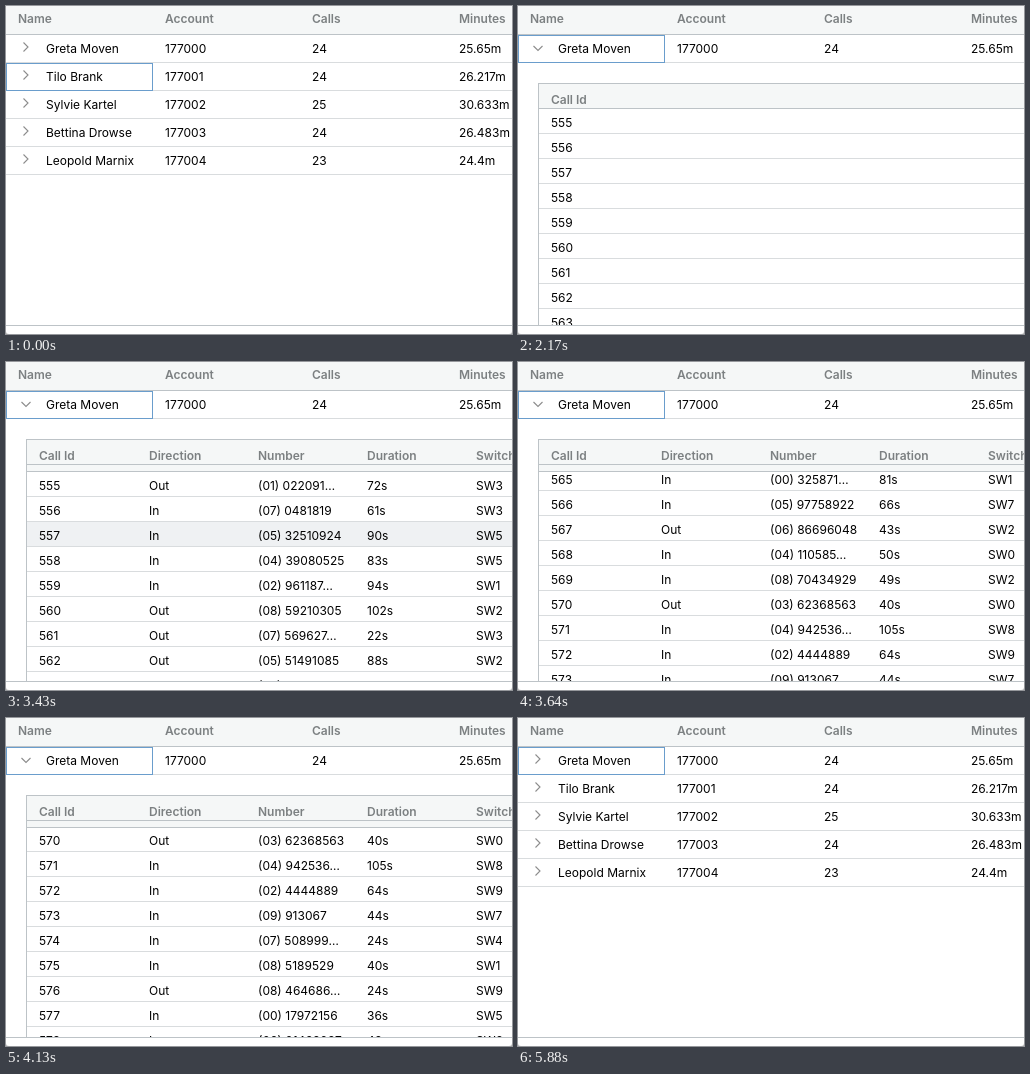
An HTML page with a canvas for the animation above (5.95 s loop, 506 by 328 pixels).

```html
<!DOCTYPE html>
<html lang="en">
<head>
<meta charset="utf-8">
<title>Master / detail table</title>
<style>
  html, body { margin: 0; width: 100%; height: 100%; overflow: hidden; background: #bbb; }
  canvas { display: block; width: 506px; height: 328px; border-radius: 0 0 3px 3px; }
</style>
</head>
<body>
<canvas></canvas>
<script>
const WIDTH = 506, HEIGHT = 328, LOOP = 5950;
const ROW = 28, HEAD = 29, BODY_END = 319;
const DETAIL_X = 20, DETAIL_Y = 77, DETAIL_HEIGHT = 300, CALL_ROW = 25, MAX_SCROLL = 376;
const OPEN_AT = 1750, COLUMNS_AT = 2240, SCROLL_AT = 3462, CLOSE_AT = 4860;
const COLOR = {
  text: '#000', label: '#7c8082', head: '#f5f7f7', border: '#bdc3c7',
  line: '#d9dcde', hover: '#eff1f3', focus: '#6a9dcc', arrow: '#8c8c8c'
};
const MAIN_X = [12, 159, 306, 453];
const CALL_X = [33, 143, 252, 361, 470];
const MAIN_LABELS = ['Name', 'Account', 'Calls', 'Minutes'];
const CALL_LABELS = ['Call Id', 'Direction', 'Number', 'Duration', 'Switch'];

const people = [
  ['Greta Moven', '177000', '24', '25.65m'],
  ['Tilo Brank', '177001', '24', '26.217m'],
  ['Sylvie Kartel', '177002', '25', '30.633m'],
  ['Bettina Drowse', '177003', '24', '26.483m'],
  ['Leopold Marnix', '177004', '23', '24.4m']
];

const digit = (row, place) => {
  const n = Math.sin(row * 12.9898 + place * 78.233) * 43758.5453;
  return Math.floor((n - Math.floor(n)) * 10);
};

// Long numbers are cut to six digits, as in a narrow column.
function phone(row, length) {
  const shown = length > 8 ? 6 : length;
  const digits = Array.from({ length: shown }, (_, k) => digit(row, k + 2)).join('');
  return `(0${digit(row, 1)}) ${digits}${length > 8 ? '…' : ''}`;
}

// Each call: direction, length of the number, seconds, switch
const calls = `Out 9 72 3,In 7 61 3,In 8 90 5,In 8 83 5,In 9 94 1,Out 8 102 2,
Out 9 22 3,Out 8 88 2,In 8 57 4,Out 7 35 6,In 9 81 1,In 8 66 7,Out 8 43 2,In 9 50 0,
In 8 49 2,Out 8 40 0,In 9 105 8,In 7 64 9,In 6 44 7,In 9 24 4,In 7 40 1,Out 9 24 9,
In 8 36 5,In 8 42 6`.split(',').map((entry, i) => {
  const [direction, length, seconds, sw] = entry.trim().split(' ');
  return [String(555 + i), direction, phone(i, +length), seconds + 's', 'SW' + sw];
});

const canvas = document.querySelector('canvas');
const ctx = canvas.getContext('2d');
const ratio = window.devicePixelRatio || 1;
canvas.width = WIDTH * ratio;
canvas.height = HEIGHT * ratio;

const clamp = v => Math.max(0, Math.min(1, v));
const during = (t, from, to) => t >= from && t < to;
const easeOut = p => 1 - (1 - clamp(p)) ** 3;

function rect(x, y, w, h, color) {
  ctx.fillStyle = color;
  ctx.fillRect(x, y, w, h);
}

function cells(values, xs, baseline, color = COLOR.text, weight = 400) {
  ctx.font = `${weight} 12px Inter, sans-serif`;
  ctx.fillStyle = color;
  values.forEach((value, i) => ctx.fillText(value, xs[i], baseline));
}

function clipped(x, y, w, h, draw) {
  ctx.save();
  ctx.beginPath();
  ctx.rect(x, y, w, h);
  ctx.clip();
  draw();
  ctx.restore();
}

function arrow(y, open) {
  const points = open ? [[15.5, 11], [20, 15.5], [24.5, 11]] : [[17.5, 7.5], [22, 12], [17.5, 16.5]];
  ctx.beginPath();
  points.forEach(([px, py]) => ctx.lineTo(px, y + py));
  ctx.strokeStyle = COLOR.arrow;
  ctx.lineWidth = 1.1;
  ctx.stroke();
}

function personRow(index, y, open, focused, hovered) {
  rect(0, y, WIDTH, ROW, hovered ? COLOR.hover : '#fff');
  rect(0, y + ROW - 1, WIDTH, 1, COLOR.line);
  arrow(y, open);
  cells(people[index], [40, ...MAIN_X.slice(1)], y + 18);
  if (focused) {
    ctx.strokeStyle = COLOR.focus;
    ctx.lineWidth = 1;
    ctx.strokeRect(0.5, y + 0.5, 146, ROW - 1);
  }
}

function detail(t) {
  const ready = t >= COLUMNS_AT;
  const columns = ready ? CALL_X.length : 1;
  const top = ready ? 110 : 103;
  const inside = DETAIL_X + 1;
  const momentum = 420 * (1 - Math.exp((SCROLL_AT - t) / 190));
  const scroll = Math.round(Math.max(0, Math.min(MAX_SCROLL, momentum)));

  clipped(inside, top, WIDTH, BODY_END - top, () => calls.forEach((call, i) => {
    const y = top + i * CALL_ROW - scroll;
    if (i === 2 && during(t, 3150, 3480)) rect(inside, y, WIDTH, CALL_ROW, COLOR.hover);
    rect(inside, y + CALL_ROW - 1, WIDTH, 1, COLOR.line);
    cells(call.slice(0, columns), CALL_X, y + 18);
  }));

  rect(DETAIL_X, DETAIL_Y, WIDTH, top - DETAIL_Y, COLOR.head);
  rect(DETAIL_X, DETAIL_Y, WIDTH, 1, COLOR.border);
  rect(DETAIL_X, DETAIL_Y, 1, DETAIL_HEIGHT, COLOR.border);
  rect(inside, 102, WIDTH, 1, COLOR.border);
  rect(inside, top - 1, WIDTH, 1, COLOR.border);
  cells(CALL_LABELS.slice(0, columns), CALL_X, 98, COLOR.label, 600);
}

function draw(t) {
  const open = during(t, OPEN_AT, CLOSE_AT);
  const expansion = t < CLOSE_AT
    ? easeOut((t - OPEN_AT) / 380)
    : 1 - easeOut((t - CLOSE_AT) / 220);
  const focusRow = t < OPEN_AT ? 1 : 0;

  ctx.setTransform(ratio, 0, 0, ratio, 0, 0);
  rect(0, 0, WIDTH, HEIGHT, '#fff');

  clipped(0, HEAD, WIDTH, BODY_END - HEAD, () => {
    if (expansion > 0) {
      ctx.globalAlpha = open ? clamp((t - OPEN_AT) / 200) : 1 - clamp((t - CLOSE_AT) / 180);
      detail(t);
      ctx.globalAlpha = 1;
    }
    people.forEach((_, i) => {
      const first = i === 0;
      const y = HEAD + i * ROW + (first ? 0 : Math.round(DETAIL_HEIGHT * expansion));
      personRow(i, y, first && open, i === focusRow, first && during(t, 4760, 5040));
    });
  });

  rect(0, 0, WIDTH, HEAD - 1, COLOR.head);
  rect(0, HEAD - 1, WIDTH, 1, COLOR.border);
  cells(MAIN_LABELS, MAIN_X, 17, COLOR.label, 600);
  rect(0, BODY_END, WIDTH, 1, COLOR.border);
}

function frame() {
  draw(performance.now() % LOOP);
  requestAnimationFrame(frame);
}
frame();
</script>
</body>
</html>
```
